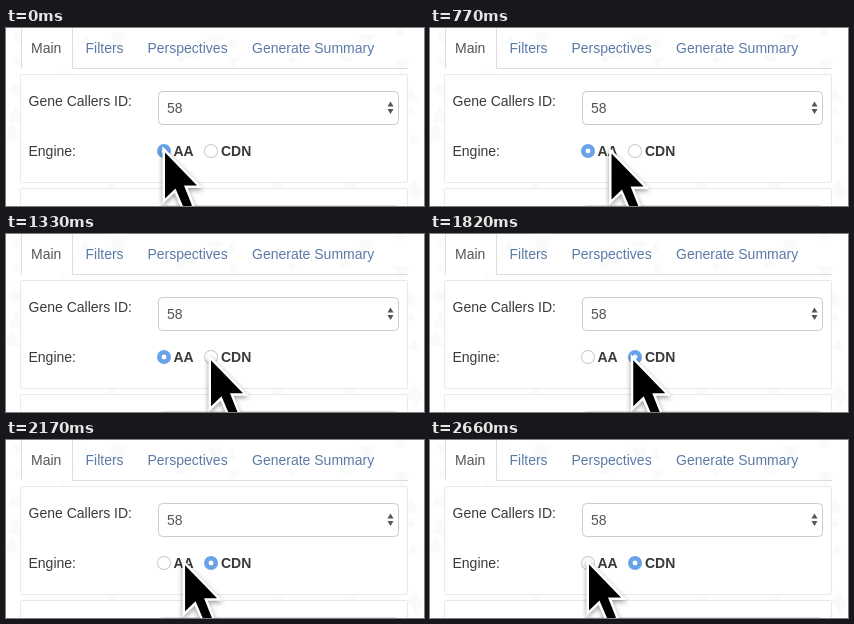
Write an HTML page with a canvas that moves like this. It is 418 px wide and 178 px high and loops after 2.73 s.

```html
<!DOCTYPE html>
<html lang="en">
<head>
<meta charset="utf-8">
<title>Engine selector</title>
<style>
html, body { margin: 0; width: 100%; height: 100%; overflow: hidden; background: #fff; }
canvas { display: block; width: 418px; height: 178px; }
</style>
</head>
<body>
<canvas id="stage"></canvas>
<script>
const W = 418, H = 178, LOOP = 2730, STEP = 70;
const LEFT = 14, RIGHT = 402;
const AA_X = 158, CDN_X = 205, RADIO_Y = 123;
const SELECT_CDN = 1610;
const ARROW = new Path2D('M0 0V46L10.5 36 19 56 27 53 19 33H32Z');

const canvas = document.getElementById('stage');
const dpr = window.devicePixelRatio || 1;
canvas.width = W * dpr;
canvas.height = H * dpr;
const ctx = canvas.getContext('2d', { alpha: false });
ctx.scale(dpr, dpr);

// Symmetric ease from 0 to 1 between two times
function ease(t, from, to) {
  const u = Math.min(1, Math.max(0, (t - from) / (to - from)));
  const a = u ** 1.4, b = (1 - u) ** 1.4;
  return a / (a + b);
}

// Glide to the second option, nudge, then glide back
function pointerAt(t) {
  const shift = 44 * ease(t, 480, 1050) + 2 * ease(t, 1190, 1330) - 46 * ease(t, 1750, 2520);
  return [159 + shift, 124.5 + shift * 0.04];
}

function seeded(seed) {
  return () => (seed = (seed * 16807) % 2147483647) / 2147483647;
}

function triangle(x, y, w, h, fill) {
  ctx.beginPath();
  ctx.moveTo(x - w / 2, y);
  ctx.lineTo(x + w / 2, y);
  ctx.lineTo(x, y + h);
  ctx.fillStyle = fill;
  ctx.fill();
}

function text(str, x, y, color, weight = '') {
  ctx.font = weight + ' 14px "Liberation Sans", Arial, sans-serif';
  ctx.fillStyle = color;
  ctx.fillText(str, x, y);
}

function box(x, y, w, h, r, stroke) {
  ctx.beginPath();
  ctx.roundRect(x + 0.5, y + 0.5, w - 1, h - 1, r);
  ctx.fillStyle = '#fff';
  ctx.fill();
  ctx.strokeStyle = stroke;
  ctx.lineWidth = 1;
  ctx.stroke();
}

function backdrop() {
  ctx.fillStyle = '#fff';
  ctx.fillRect(0, 0, W, H);
  const rand = seeded(41);
  for (let i = 0; i < 70; i++) {
    const size = 8 + rand() * 10;
    triangle(rand() * W, rand() * H, size, rand() < 0.5 ? size : -size, '#f9fafa');
  }
}

function tabs() {
  ctx.fillStyle = '#fff';
  ctx.fillRect(15, 0, 52, 42);
  ctx.beginPath();
  ctx.moveTo(15.5, 0);
  ctx.lineTo(15.5, 40.5);
  ctx.moveTo(66.5, 0);
  ctx.lineTo(66.5, 40.5);
  ctx.lineTo(RIGHT, 40.5);
  ctx.strokeStyle = '#ddd';
  ctx.lineWidth = 1;
  ctx.stroke();
  const link = '#5b7ba6';
  text('Main', 25, 25, '#555');
  text('Filters', 79.5, 25, link);
  text('Perspectives', 141.5, 25, link);
  text('Generate Summary', 246, 25, link);
}

function panels() {
  const edge = '#e9e9e9', ink = '#3a3a3a';
  box(LEFT, 46, RIGHT - LEFT, 109, 1, edge);
  box(LEFT, 160, RIGHT - LEFT, 60, 1, edge);
  text('Gene Callers ID:', 22.5, 78, ink);
  text('Engine:', 22.5, 128, ink);
  box(152, 63, 241, 34, 4, '#ccc');
  box(152, 177, 241, 34, 4, '#ddd');
  text('58', 161, 85, '#555');
  triangle(384.5, 78.5, 6, -5, '#555');
  triangle(384.5, 81, 6, 5, '#555');
  text('AA', 167.5, 128, ink, 'bold');
  text('CDN', 215, 128, ink, 'bold');
}

function disc(x, y, r, fill) {
  ctx.beginPath();
  ctx.arc(x, y, r, 0, Math.PI * 2);
  ctx.fillStyle = fill;
  ctx.fill();
}

function radio(x, on) {
  disc(x, RADIO_Y, 7, on ? '#68a3ea' : '#c8c8c8');
  disc(x, RADIO_Y, on ? 2.4 : 6.1, '#fff');
}

function pointer(x, y) {
  ctx.save();
  ctx.translate(x, y);
  ctx.save();
  ctx.shadowColor = 'rgba(0, 0, 0, 0.4)';
  ctx.shadowBlur = 5 * dpr;
  ctx.shadowOffsetY = 2 * dpr;
  ctx.lineWidth = 5;
  ctx.strokeStyle = '#fff';
  ctx.stroke(ARROW);
  ctx.restore();
  ctx.fillStyle = '#000';
  ctx.fill(ARROW);
  ctx.restore();
}

function draw(now) {
  const t = Math.floor((now % LOOP) / STEP) * STEP;
  const cdn = t >= SELECT_CDN;
  backdrop();
  tabs();
  panels();
  radio(AA_X, !cdn);
  radio(CDN_X, cdn);
  pointer(...pointerAt(t));
}

const start = performance.now();
function tick() {
  draw(performance.now() - start);
  requestAnimationFrame(tick);
}
tick();
</script>
</body>
</html>
```
